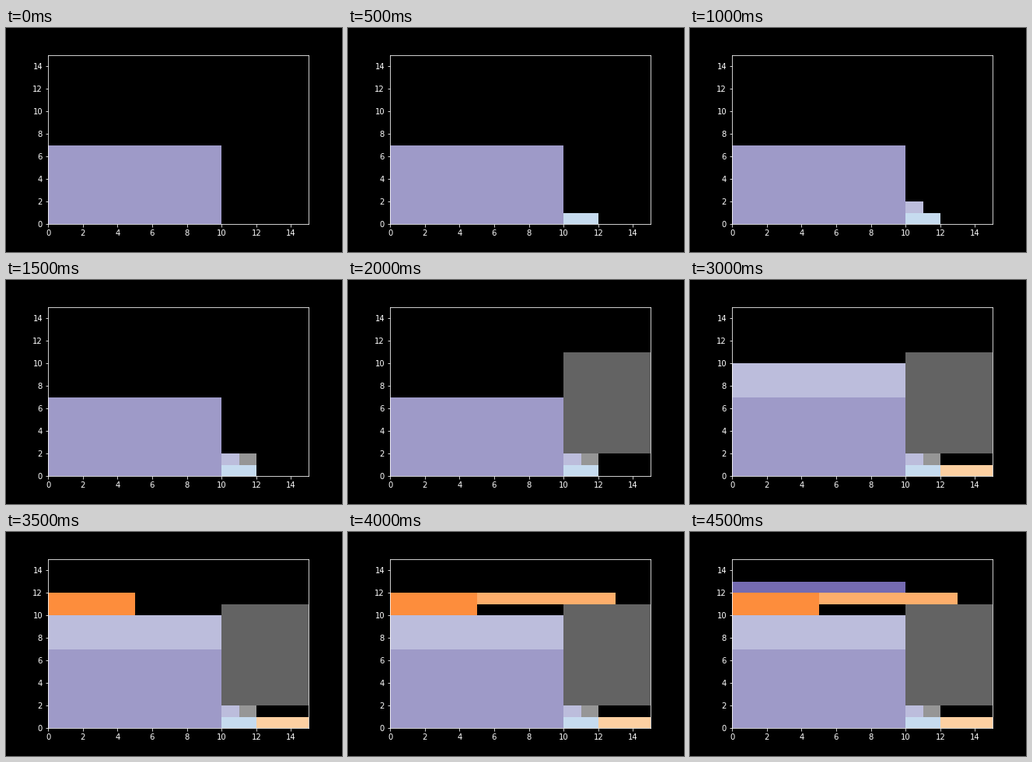
Recreate the animation shown at these times as a matplotlib script. Size 432 by 288 pixels, loop 5000 ms.

```python
import matplotlib.pyplot as plt
from matplotlib.animation import FuncAnimation
from matplotlib.patches import Rectangle

plt.style.use("dark_background")

SIDE = 15
STEP_MS = 500

# x, y, width, height, colour in packing order
BOXES = [
    (0, 0, 10, 7, "#9e9ac8"),
    (10, 0, 2, 1, "#c6dbef"),
    (10, 1, 1, 1, "#bcbddc"),
    (11, 1, 1, 1, "#969696"),
    (10, 2, 5, 9, "#636363"),
    (0, 7, 10, 3, "#bcbddc"),
    (12, 0, 3, 1, "#fdd0a2"),
    (0, 10, 5, 2, "#fd8d3c"),
    (5, 11, 8, 1, "#fdae6b"),
    (0, 12, 10, 1, "#756bb1"),
]

fig = plt.figure(figsize=(6, 4), dpi=72)
fig.subplots_adjust(left=0.125, right=0.9, bottom=0.125, top=0.88)
ax = fig.add_subplot()
ax.set_xlim(0, SIDE)
ax.set_ylim(0, SIDE)
ax.set_xticks(range(0, SIDE, 2))
ax.set_yticks(range(0, SIDE, 2))

patches = [
    ax.add_patch(Rectangle((x, y), w, h, facecolor=color))
    for x, y, w, h, color in BOXES
]


def update(step):
    for i, patch in enumerate(patches):
        patch.set_visible(i <= step)
    return patches


anim = FuncAnimation(
    fig,
    update,
    frames=len(BOXES),
    init_func=lambda: update(0),
    interval=STEP_MS,
    repeat=True,
    repeat_delay=0,
    blit=False,
)

plt.show()
```
